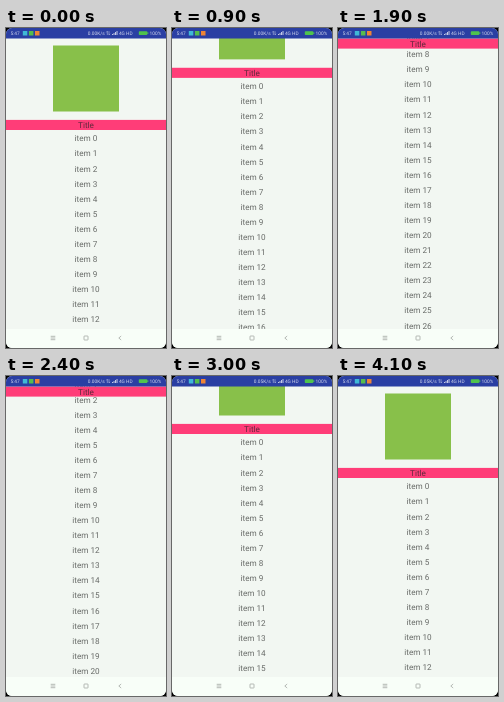
An HTML page that plays this animation: 160x320 px, repeating every 4700 ms.

```html
<!DOCTYPE html>
<html lang="en">
<head>
<meta charset="utf-8">
<title>Sticky title list</title>
<style>
html, body { margin: 0; width: 100%; height: 100%; overflow: hidden; background: #000; }
svg { display: block; width: 160px; height: 320px; }
text { font: 8.2px Roboto, sans-serif; text-rendering: geometricPrecision; }
#list, #head { text-anchor: middle; }
#list { fill: #686b68; }
#status text { font-size: 4.8px; fill: #d5daee; }
</style>
</head>
<body>
<svg viewBox="0 0 160 320">
  <clipPath id="screen"><rect width="160" height="320" rx="6"/></clipPath>
  <g clip-path="url(#screen)">
    <rect width="160" height="320" fill="#f2f7f2"/>
    <g id="list"></g>
    <rect id="logo" x="47" y="17.5" width="66" height="66" fill="#88c04a"/>
    <g id="head">
      <rect width="160" height="10.1" fill="#ff3d78"/>
      <text x="80" y="8.4" fill="#63283c">Title</text>
    </g>
    <g id="status">
      <rect width="160" height="10.5" fill="#2a3fa3"/>
      <text x="4.5" y="7">5:47</text>
      <rect x="16.8" y="3" width="4.5" height="4.5" fill="#3fb9d6"/>
      <rect x="22.9" y="3" width="4.5" height="4.5" fill="#55bd4c"/>
      <rect x="29" y="3" width="4.5" height="4.5" fill="#ee8436"/>
      <text id="speed" x="81.8" y="7">0.00K/s</text>
      <path d="M101.3 7V3.2l-1 1.2M103 3.2V7l1-1.2" fill="none" stroke="#d5daee" stroke-width=".5"/>
      <path d="M106.5 7v-1M108 7v-2M109.5 7v-3M111 7v-4" stroke="#d5daee" stroke-width=".9"/>
      <text x="112.9" y="7">4G HD</text>
      <rect x="132.8" y="3.2" width="8.5" height="3.9" rx=".8" fill="#4fc34d"/>
      <rect x="141.3" y="4.3" width="1" height="1.7" fill="#4fc34d"/>
      <text x="143.6" y="7">100%</text>
    </g>
    <rect y="301" width="160" height="19" fill="#f8fef8"/>
    <g fill="none" stroke="#989c99" stroke-width=".7">
      <path d="M44.7 308.3h4.6M44.7 310h4.6M44.7 311.7h4.6M115.2 308l-2.4 2 2.4 2"/>
      <rect x="78" y="308" width="4" height="4" rx=".5"/>
    </g>
  </g>
</svg>
<script>
const LOOP = 4700, STEP = 100, PITCH = 15.07, TITLE_Y = 91.9, PIN_Y = 10.5;
const $ = id => document.getElementById(id);

// [time in ms, scroll distance in px]
const scrollKeys = [
  [0, 0], [400, 0], [600, 10.5], [1000, 66], [1300, 116.7], [1600, 172],
  [1900, 204.7], [2000, 204.7], [2400, 117], [2600, 90], [3000, 44],
  [3200, 3], [3500, 0], [LOOP, 0]
];

$('list').innerHTML = Array.from({ length: 28 }, (_, i) =>
  `<text x="80" y="${113.4 + i * PITCH}">item ${i}</text>`).join('');

function scrollAt(t) {
  const i = scrollKeys.findIndex(([time]) => time > t);
  const [t0, a] = scrollKeys[i - 1], [t1, b] = scrollKeys[i];
  return a + (b - a) * (t - t0) / (t1 - t0);
}

function moveY(id, y) {
  $(id).setAttribute('transform', `translate(0 ${y})`);
}

function draw() {
  // The screen refreshes in hard 100 ms steps.
  const t = Math.floor(performance.now() % LOOP / STEP) * STEP;
  const scroll = scrollAt(t);
  moveY('list', -scroll);
  moveY('logo', -scroll);
  moveY('head', Math.max(PIN_Y, TITLE_Y - scroll));
  $('speed').textContent = t < 2500 ? '0.00K/s' : '0.05K/s';
  requestAnimationFrame(draw);
}
draw();
</script>
</body>
</html>
```
